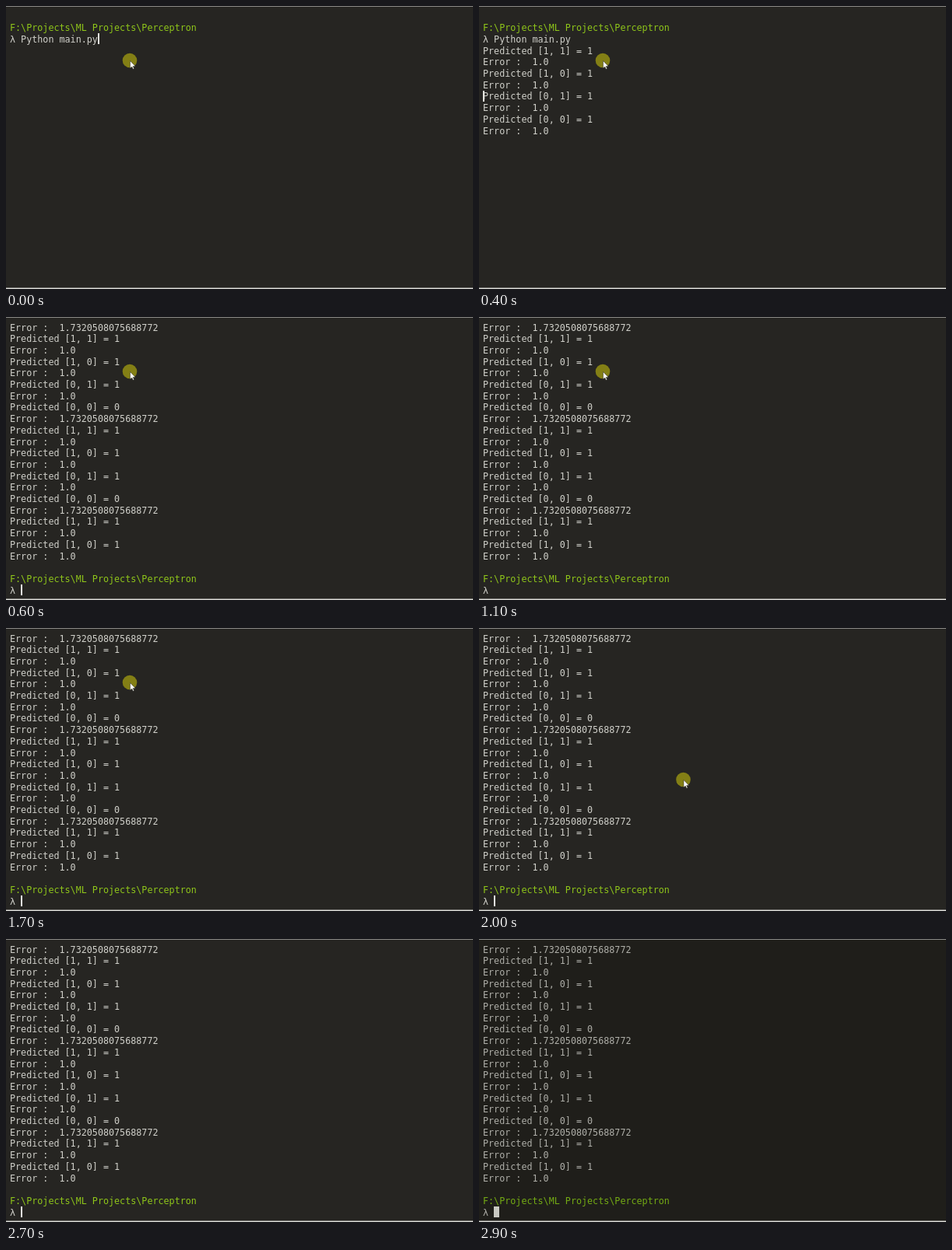
Animation, 600 px wide and 364 px high, one loop 3000 ms. Source, as an HTML page:

```html
<!DOCTYPE html>
<html lang="en">
<head>
<meta charset="utf-8">
<title>Perceptron run</title>
<style>
  html, body { margin: 0; width: 100%; height: 100%; overflow: hidden; background: #262522; }
  svg { display: block; }
  text { font: 11.72px "DejaVu Sans Mono", "Noto Sans Mono", monospace; white-space: pre; fill: #d0d0ca; }
  #back { fill: #262522; }
  #caret { fill: #e6e6e0; }
  .path { fill: #8fc61a; }
  .dim text { fill: #aeaea8; }
  .dim .path { fill: #74ab14; }
  .dim #back { fill: #1f1e1a; }
  .dim #caret { fill: #c8c8c2; }
</style>
</head>
<body>
<svg id="stage" width="600" height="364" viewBox="0 0 600 364">
  <rect id="back" width="600" height="364"/>
  <rect width="600" height="1" fill="#8a8a87"/>
  <rect y="362.5" width="600" height="1.5" fill="#dcdcd8"/>
  <g id="lines"></g>
  <rect id="caret" height="14"/>
  <g id="mouse">
    <circle r="9.3" fill="#837f15"/>
    <path d="M.5 .5V10L2.7 8 4.2 11.2 5.6 10.6 4.2 7.4H7.2Z" fill="#fff" stroke="#25251c" stroke-width=".5"/>
  </g>
</svg>
<script>
const LOOP = 3000, TICK = 100, CHAR = 7.056, ROW = 14.7, LEFT = 5, TOP = 6;
const $ = id => document.getElementById(id);
const PATH = "F:\\Projects\\ML Projects\\Perceptron";
const INPUTS = ["[1, 1]", "[1, 0]", "[0, 1]", "[0, 0]"];
const ROOT3 = "Error :  " + Math.sqrt(3);

// One prediction and its error; a wrong guess of 0 gives the larger error.
const step = (k, out) => [
  `Predicted ${INPUTS[k % 4]} = ${out}`,
  out ? "Error :  1.0" : ROOT3
];
const steps = (n, outOf) => Array.from({ length: n }, (_, k) => step(k, outOf(k))).flat();

const command = ["", PATH, "λ Python main.py"];
const output = steps(6, k => k === 4 ? 0 : 1);
const finished = [ROOT3, ...steps(10, k => k % 4 === 3 ? 0 : 1), "", PATH, "λ"];

// Screen text with the caret's row and column; a missing column hides the caret.
function terminal(t) {
  if (t < 100) return { lines: command, row: 2, col: 16 };
  if (t < 600) {
    const printed = Math.floor((t - 100) / 400 * 11);
    return {
      lines: [...command, ...output.slice(0, printed)],
      row: command.length + Math.max(0, printed - 4), // the caret lags behind the output
      col: 0
    };
  }
  const visible = t < 1100 || (t >= 1700 && t < 2200) || t >= 2700;
  return { lines: finished, row: 23, col: visible ? 2 : undefined };
}

// The pointer rests, glides out through the bottom edge and peeks in once more.
function pointer(t) {
  if (t < 2000) return [159, 70];
  if (t < 2200) {
    const p = (t - 1900) / 200;
    return [159 + 207 * p, 70 + 250 * p];
  }
  return t >= 2400 && t < 2500 ? [319, 351] : [-50, -50];
}

let shown = "";
function show(lines) {
  const key = lines.join("\n");
  if (key === shown) return;
  shown = key;
  $("lines").replaceChildren(...lines.map((line, row) => {
    const el = document.createElementNS("http://www.w3.org/2000/svg", "text");
    el.setAttribute("x", LEFT);
    el.setAttribute("y", TOP + 11.5 + row * ROW);
    if (line === PATH) el.setAttribute("class", "path");
    el.textContent = line;
    return el;
  }));
}

function draw(now) {
  const t = Math.floor(now % LOOP / TICK) * TICK;
  const { lines, row, col } = terminal(t);
  const unfocused = t >= 2900;
  show(lines);
  $("stage").setAttribute("class", unfocused ? "dim" : "");
  const caret = $("caret");
  caret.setAttribute("x", Math.round(LEFT + (col ?? 0) * CHAR));
  caret.setAttribute("y", Math.round(TOP + row * ROW));
  caret.setAttribute("width", col === undefined ? 0 : unfocused ? 7 : 2);
  $("mouse").setAttribute("transform", `translate(${pointer(t)})`);
}

const start = performance.now();
function tick() {
  draw(performance.now() - start);
  requestAnimationFrame(tick);
}
tick();
</script>
</body>
</html>
```
